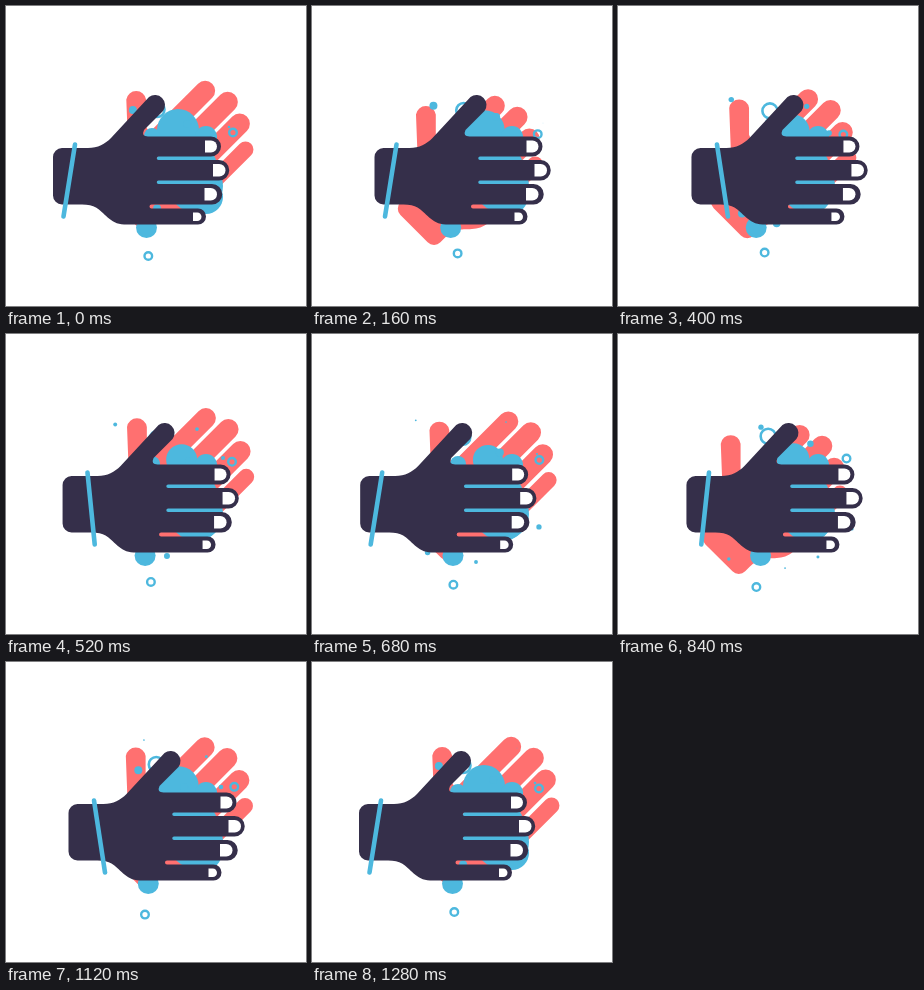
Recreate the animation shown at these times as an HTML page with a canvas. Size 300x300 px, loop 1320 ms.

```html
<!DOCTYPE html>
<html>
<head>
<meta charset="utf-8">
<style>
html, body { margin: 0; overflow: hidden; background: #fff; }
canvas { display: block; }
</style>
</head>
<body>
<canvas id="stage" width="300" height="300"></canvas>
<script>
const ctx = document.getElementById('stage').getContext('2d');
const DARK = '#352f4a', PINK = '#ff7070', CYAN = '#4db8de';
const LOOP = 1320, STEP = 40, CYCLE = 1280, RUB = 640;

const hand = left => new Path2D(`M${left + 9} 142H82C92 142 99 138 105 132L143 91
  A10 10 0 0 1 157 105L138 124Q135 130.5 142 130.5
  H205A10 10 0 0 1 205 150.5H152.5A1.75 1.75 0 0 0 152.5 154
  H213A10.25 10.25 0 0 1 213 174.5H152.5A1.75 1.75 0 0 0 152.5 178
  H206A10.25 10.25 0 0 1 206 198.5H145.5A2 2 0 0 0 145.5 202.5
  H192A8 8 0 0 1 192 218.5H118C104 218 98 206 90 201.5Q85 198.5 76 198.5
  H${left + 9}A9 9 0 0 1 ${left} 189.5V151A9 9 0 0 1 ${left + 9} 142Z`);
const frontHand = hand(47), backHand = hand(61);

// left, top, width, height
const nails = [[199, 134.5, 12, 12], [207, 158, 12.5, 12.5], [198.5, 182, 12.5, 12.5], [187, 206.5, 8.5, 8.5]];

// vanishing point, velocity in px/ms, time of vanishing
const drops = [
  [99, 82.7, -.034, -.026, 820],
  [135.6, 71, -.018, -.054, 1250],
  [245, 198, .044, .0125, 1090],
  [169.7, 239.3, .019, .0375, 980],
  [205.7, 234.5, .025, .05, 1070],
  [103, 235.4, -.03, .04, 1100],
  [196.5, 82.3, .019, -.044, 810],
  [206.7, 82.8, .0286, -.054, 1340],
  [233, 116, .05, -.025, 200],
  [233, 116, .05, -.025, 840]
];

const wave = (t, period) => Math.cos(2 * Math.PI * t / period);
const smooth = u => u * u * (3 - 2 * u);
const clamp = u => Math.min(1, Math.max(0, u));

function circle(x, y, r, ring) {
  ctx.beginPath();
  ctx.arc(x, y, r, 0, 7);
  if (ring) {
    ctx.lineWidth = ring;
    ctx.stroke();
  } else ctx.fill();
}

function drawFoam(c, s) {
  circle(174 - 2 * c, 125 - c, 18 + 3 * c);
  circle(200, 131, 11);
  circle(146, 130, 8);
  circle(180, 165, 32);
  circle(190, 180, 27);
  circle(198 + 2 * c, 191, 15.5 + 1.5 * c);
  circle(140.5 - 2.5 * s, 221.5, 10.5);
}

function drawBubbles(t, s) {
  circle(142.3 + 4.7 * s, 250 - 3.7 * s, 3.8, 2.4);
  circle(227 - 1.8 * s, 126.5 + 2.3 * s, 3.8, 2.4);
  circle(151 + s, 103.5 + 1.5 * s, 7.5, 2.6);
  for (const [x, y, vx, vy, end] of drops) {
    const left = (end - t + CYCLE) % CYCLE;
    if (left < 1000) circle(x - vx * left, y - vy * left, Math.min(4, left * .0065));
  }
}

function drawFrontHand(t) {
  ctx.save();
  ctx.translate(15.5 * (1 - wave(t, RUB)), 0);
  ctx.fillStyle = DARK;
  ctx.fill(frontHand);
  ctx.fillStyle = '#fff';
  for (const [x, y, w, h] of nails) {
    ctx.beginPath();
    ctx.roundRect(x, y, w, h, [0, h / 2, h / 2, 0]);
    ctx.fill();
  }
  const tilt = clamp(.5 - .87 * wave(t - 80, RUB));
  ctx.lineWidth = 4.6;
  ctx.lineCap = 'round';
  ctx.beginPath();
  ctx.moveTo(69 + 3.5 * tilt, 138.5);
  ctx.lineTo(57.5 + 26 * tilt, 210.5);
  ctx.stroke();
  ctx.restore();
}

function drawBackHand(t) {
  const u = smooth(.5 + .5 * wave(t - 565, RUB));
  ctx.save();
  ctx.translate(181.5 + 18.5 * u, 101 - 17 * u);
  ctx.rotate(-Math.PI / 4);
  ctx.translate(-205, -140.5);
  ctx.fillStyle = PINK;
  ctx.fill(backHand);
  ctx.restore();
}

function draw(now) {
  const t = Math.floor(now % LOOP / STEP) * STEP;
  const c = wave(t, CYCLE), s = wave(t - CYCLE / 4, CYCLE);
  ctx.fillStyle = '#fff';
  ctx.fillRect(0, 0, 300, 300);
  drawBackHand(t);
  ctx.fillStyle = ctx.strokeStyle = CYAN;
  drawFoam(c, s);
  drawBubbles(t, s);
  drawFrontHand(t);
  requestAnimationFrame(draw);
}
requestAnimationFrame(draw);
</script>
</body>
</html>
```
